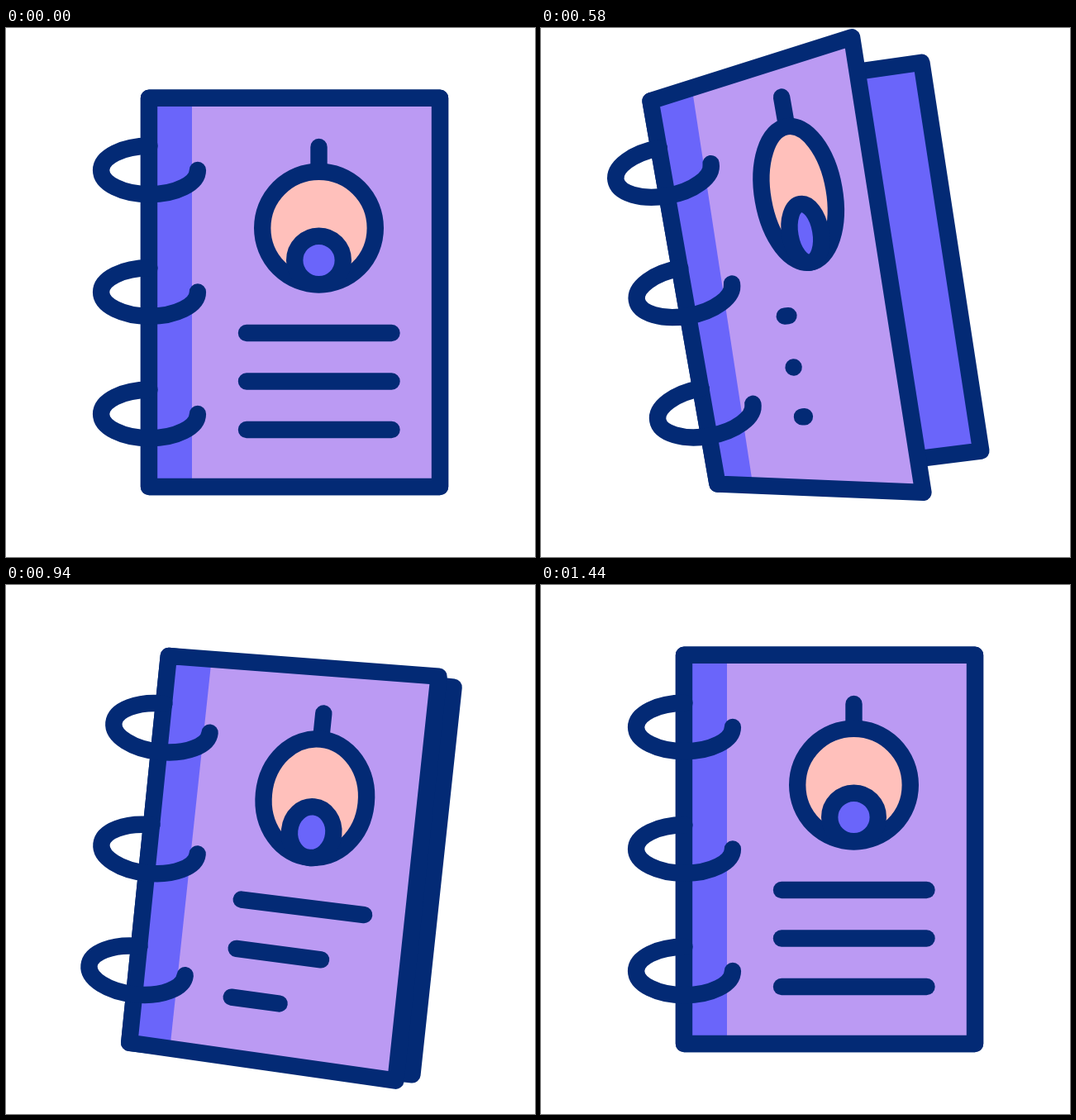
Write an HTML page with a canvas that moves like this. It is 640x640 px and loops after 1620 ms.

```html
<!DOCTYPE html>
<html>
<head>
<meta charset="utf-8">
<style>
  html, body { margin: 0; width: 100%; height: 100%; overflow: hidden; background: #fff; }
  canvas { display: block; width: 640px; height: 640px; }
</style>
</head>
<body>
<canvas id="stage" width="640" height="640"></canvas>
<script>
const ctx = document.getElementById('stage').getContext('2d');
const LOOP = 1620;
const NAVY = '#032a75', LILAC = '#bb9af3', BLUE = '#6a65fa', PINK = '#ffc0bb';

// Keyframes as [time, value], with sine easing between them
const TILT = [[0, 0], [535, -10.1], [552, -10.1], [970, 6], [1200, -2], [1435, 0]];
const OPEN = [[0, 0], [433, 1], [668, 1], [1076, 0]];
const LINES = [
  { y: 49, drop: 0, slope: 0.09, keys: [[0, 1], [510, 0], [1000, 1]] },
  { y: 107.5, drop: 4.4, slope: 0.12, keys: [[0, 1], [590, 0], [1168, 1]] },
  { y: 166, drop: 6.6, slope: 0.14, keys: [[0, 1], [655, 0], [1335, 1]] }
];

function valueAt(keys, t) {
  const next = keys.findIndex(key => key[0] > t);
  if (next < 0) return keys[keys.length - 1][1];
  const [t0, a] = keys[next - 1], [t1, b] = keys[next];
  return a + (b - a) * (1 - Math.cos(Math.PI * (t - t0) / (t1 - t0))) / 2;
}

function paint(fill, stroke = true) {
  if (fill) {
    ctx.fillStyle = fill;
    ctx.fill();
  }
  if (stroke) ctx.stroke();
}

function polygon(...points) {
  ctx.beginPath();
  points.forEach(([x, y]) => ctx.lineTo(x, y));
  ctx.closePath();
}

function line(x0, y0, x1, y1) {
  ctx.beginPath();
  ctx.moveTo(x0, y0);
  ctx.lineTo(x1, y1);
  ctx.stroke();
}

function ellipse(x, y, rx, ry, end = 2 * Math.PI, start = 0) {
  ctx.beginPath();
  ctx.ellipse(x, y, rx, ry, 0, start, end);
}

function drawPages(open) {
  const top = [-0.5, -235.3], bottom = [-0.5, 235];
  polygon(top, [351.5 - 21 * open, -235.3 + 10.6 * open],
    [351.5 - 31 * open, 235 + 15.5 * open], bottom);
  paint(BLUE);

  const cover = [top, [351.5 - 98.8 * open, -235.3 - 34 * open],
    [351.5 - 108.5 * open, 235 + 53 * open], bottom];
  polygon(...cover);
  paint(LILAC, false);
  polygon(top, [51.5, -235 - 5 * open], [51.5 - 10 * open, 235 + 7.7 * open], bottom);
  paint(BLUE, false);
  polygon(...cover);
  paint();
}

// Squeezed sideways and stretched upwards from a fixed base
function drawEmblem(open) {
  const x = 205 - 48.5 * open, base = -9.7;
  const sx = 1 - 0.364 * open, sy = 1 + 0.221 * open;
  line(x, base - 166.3 * sy, x, base - 136.6 * sy);
  for (const [r, fill] of [[68.3, PINK], [29.3, BLUE]]) {
    ellipse(x, base - r * sy, r * sx, r * sy);
    paint(fill);
  }
}

function drawLines(open, t) {
  const x = 117.5 - 3 * open;
  for (const { y, drop, slope, keys } of LINES) {
    const length = (175.5 - 83 * open) * valueAt(keys, t);
    const y0 = y + drop * open;
    line(x, y0, x + length + 0.01, y0 + slope * open * length);
  }
}

function drawRings() {
  for (const y of [-148, -0.5, 147]) {
    ellipse(0, y, 58.4, 29.3, -Math.PI / 2, 0);
    ctx.beginPath();
    ctx.ellipse(0, y, 58.4, 29.3, 0, 0, 1.5 * Math.PI);
    ctx.stroke();
  }
}

function frame() {
  const t = performance.now() % LOOP;
  const open = valueAt(OPEN, t);
  ctx.clearRect(0, 0, 640, 640);
  ctx.save();
  ctx.translate(173.5, 320);
  ctx.rotate(valueAt(TILT, t) * Math.PI / 180);
  ctx.strokeStyle = NAVY;
  ctx.lineWidth = 20.4;
  ctx.lineCap = ctx.lineJoin = 'round';
  drawPages(open);
  drawEmblem(open);
  drawLines(open, t);
  drawRings();
  ctx.restore();
  requestAnimationFrame(frame);
}
frame();
</script>
</body>
</html>
```
